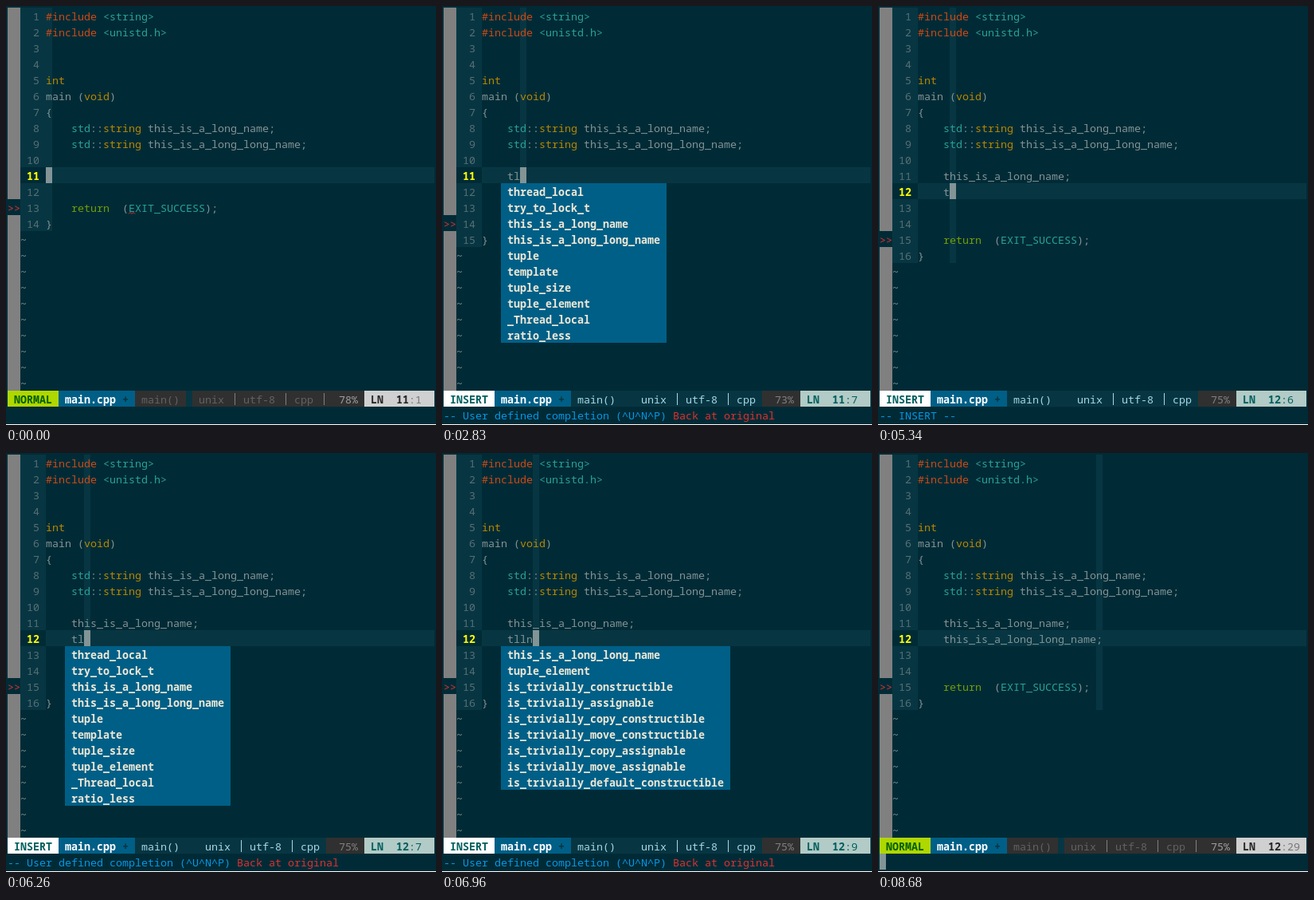
Animation, 540 px wide and 525 px high, one loop 8.73 s. Source, as an HTML page with a canvas:

```html
<!DOCTYPE html>
<html lang="en">
<head>
<meta charset="utf-8">
<title>Editor completion</title>
<style>
html, body { margin: 0; width: 100%; height: 100%; overflow: hidden; background: #002b36; }
canvas { display: block; }
</style>
</head>
<body>
<canvas id="stage" width="540" height="525"></canvas>
<script>
const ctx = document.getElementById('stage').getContext('2d');
const LOOP = 8730, CELL = 8, ROW = 20, PAD = 2, BASELINE = 16, CODE_X = 50;
const STATUS_ROW = 25, MESSAGE_ROW = 26;
const C = {
  bg: '#002b36', shade: '#073642', dim: '#586e75', text: '#839496', orange: '#cb4b16',
  cyan: '#2aa198', yellow: '#b58900', green: '#719e07', red: '#dc322f', blue: '#0896e6',
  menu: '#005f87', menuSel: '#0087af', menuText: '#eee8d5', grey: '#303030'
};

// Each line of code is a list of [color, text] runs.
const declare = name => [[C.text, '    '], [C.cyan, 'std'], [C.text, '::'], [C.yellow, 'string'], [C.text, ` ${name};`]];
const include = file => [[C.orange, '#include '], [C.cyan, `<${file}>`]];
const NAME = 'this_is_a_long_name', LONG_NAME = 'this_is_a_long_long_name';
const HEAD = [
  include('string'), include('unistd.h'), [], [],
  [[C.yellow, 'int']],
  [[C.text, 'main ('], [C.yellow, 'void'], [C.text, ')']],
  [[C.text, '{']],
  declare(NAME), declare(LONG_NAME), []
];
const TAIL = [
  [], [],
  [[C.green, '    return'], [C.text, '  ('], [C.cyan, 'EXIT_SUCCESS'], [C.text, ');']],
  [[C.text, '}']]
];

const trivially = names => names.split(' ').map(name => 'is_trivially_' + name);
const TLLN_LIST = [LONG_NAME, 'tuple_element', ...trivially(
  'constructible assignable copy_constructible move_constructible copy_assignable move_assignable default_constructible')];
const TLN_LIST = [NAME, ...TLLN_LIST];
const TLL_LIST = [LONG_NAME, 'thread_local', 'tuple_element', '_Thread_local', 'const_local_iterator',
  ...trivially('copyable assignable destructible constructible'), 'ratio_less_equal'];
const TL_LIST = ['thread_local', 'try_to_lock_t', NAME, LONG_NAME, 'tuple', 'template',
  'tuple_size', 'tuple_element', '_Thread_local', 'ratio_less'];
const T_LIST = [NAME, LONG_NAME, 'thread_local', 'template', 'typedef', 'typename', 'this', 'throw', 'true', 'try'];

const INSERT = '-- INSERT --';
const COMPLETION = '-- User defined completion (^U^N^P) ';
const BACK = 'Back at original';
const DONE = NAME + ';', LONG_DONE = LONG_NAME + ';';

// [start in ms, typed lines, column, options]
const STATES = [
  [0, [], 1, { normal: true, cursor: true, lint: true }],
  [710, [''], 1, { normal: true, message: INSERT }],
  [750, [''], 5, { cursor: true }],
  [2100, ['t'], 5, { columnTop: 12 }],
  [2140, ['t'], 6, { cursor: true, list: T_LIST }],
  [2790, ['tl'], 6, { note: BACK }],
  [2830, ['tl'], 7, { cursor: true, list: TL_LIST }],
  [3020, ['tln'], 8, { cursor: true, list: TLN_LIST }],
  [3640, [NAME], 8, { list: TLN_LIST }],
  [3680, [NAME], 8, { list: TLN_LIST, selected: true }],
  [3960, [DONE], 8, { list: TLN_LIST, selected: true }],
  [4400, [DONE, ''], 5, {}],
  [4440, [DONE, ''], 5, { cursor: true }],
  [5300, [DONE, 't'], 5, {}],
  [5340, [DONE, 't'], 6, { cursor: true }],
  [6220, [DONE, 'tl'], 6, {}],
  [6260, [DONE, 'tl'], 7, { cursor: true, list: TL_LIST }],
  [6520, [DONE, 'tll'], 8, { message: '' }],
  [6570, [DONE, 'tll'], 8, { cursor: true, list: TLL_LIST }],
  [6920, [DONE, 'tlln'], 8, { note: BACK }],
  [6960, [DONE, 'tlln'], 9, { cursor: true, list: TLLN_LIST }],
  [7520, [DONE, LONG_NAME], 9, { list: TLLN_LIST }],
  [7560, [DONE, LONG_NAME], 9, { list: TLLN_LIST, selected: true }],
  [7860, [DONE, LONG_DONE], 9, { list: TLLN_LIST, selected: true }],
  [8680, [DONE, LONG_DONE], 29, { normal: true, commandCursor: true }]
];

const rowTop = row => PAD + (row - 1) * ROW;

function box(x, row, width, color, rows = 1) {
  ctx.fillStyle = color;
  ctx.fillRect(x, rowTop(row), width, rows * ROW);
}

function write(x, row, color, text, bold = false) {
  ctx.font = `${bold ? 'bold ' : ''}13.333px "Noto Sans Mono", monospace`;
  ctx.fillStyle = color;
  ctx.fillText(text, x, rowTop(row) + BASELINE);
}

function writeRuns(x, row, runs) {
  for (const [color, text] of runs) {
    write(x, row, color, text);
    x += text.length * CELL;
  }
}

function drawSquiggle(x, y) {
  ctx.strokeStyle = C.red;
  ctx.lineWidth = 1;
  ctx.beginPath();
  for (let i = 0; i <= 4; i++) ctx.lineTo(x + i * 2, y + (i % 2 ? -1.5 : 0.5));
  ctx.stroke();
}

function drawCode(typed, row, column, { cursor, columnTop = 1, lint }) {
  const lines = [...HEAD, ...typed.map(text => [[C.text, '    ' + text]]), ...TAIL];
  const signRow = lines.length - 1;
  const columnX = CODE_X + (column - 1) * CELL;

  box(PAD, 1, 16, '#808080', 24);
  box(PAD, signRow, 16, C.bg);
  write(PAD, signRow, C.red, '>>');
  box(18, 1, 32, C.shade, lines.length);
  box(18, row, 32, C.bg);
  box(columnX, columnTop, CELL, C.shade, lines.length - columnTop + 1);
  box(CODE_X, row, 488, C.shade);
  if (cursor) box(columnX, row, CELL, C.text);

  lines.forEach((runs, i) => {
    const current = i + 1 === row;
    write(26, i + 1, current ? '#ffff00' : C.dim, String(i + 1).padStart(2), current);
    writeRuns(CODE_X, i + 1, runs);
  });
  for (let r = lines.length + 1; r < STATUS_ROW; r++) write(18, r, C.text, '~');
  if (lint) drawSquiggle(154, rowTop(signRow) + 18);
}

function drawMenu(list, row, selected) {
  const width = (Math.max(...list.map(item => item.length)) + 2) * CELL;
  box(74, row + 1, width, C.menu, list.length);
  if (selected) box(74, row + 1, width, C.menuSel);
  list.forEach((item, i) => write(82, row + 1 + i, C.menuText, item, true));
}

function drawStatus(normal, row, column, lineCount) {
  const look = normal
    ? { mode: 'NORMAL', modeBg: '#afd700', modeText: '#005f00', midBg: C.grey, midText: '#626262',
        infoX: 242, percent: '#9e9e9e', endBg: '#d0d0d0', endText: '#262626', columnText: '#767676' }
    : { mode: 'INSERT', modeBg: '#ffffff', modeText: '#005f5f', midBg: C.shade, midText: '#a5d8e6',
        infoX: 250, percent: '#808080', endBg: '#b2cbc6', endText: '#005f5f', columnText: '#005f5f' };
  const put = (x, color, text, bold) => write(x, STATUS_ROW, color, text, bold);
  const fill = (x, width, color) => box(x, STATUS_ROW, width, color);

  fill(PAD, 64, look.modeBg);
  fill(66, 96, C.menu);
  fill(162, 240, look.midBg);
  fill(402, 48, C.grey);
  fill(450, 88, look.endBg);
  if (normal) fill(226, 8, C.shade);

  put(10, look.modeText, look.mode, true);
  put(74, '#ffffff', 'main.cpp', true);
  put(146, C.shade, '+', true);
  put(170, look.midText, 'main()');
  put(look.infoX, look.midText, 'unix');
  put(look.infoX + 56, look.midText, 'utf-8');
  put(look.infoX + 120, look.midText, 'cpp');
  ctx.fillStyle = normal ? '#808080' : look.midText;
  const bars = normal ? [45, 109, 157] : [45, 109];
  for (const dx of bars) ctx.fillRect(look.infoX + dx, rowTop(STATUS_ROW) + 3, 1, 15);
  put(418, look.percent, Math.floor(row / lineCount * 100) + '%');
  put(458, look.endText, 'LN', true);
  put(490, look.endText, String(row), true);
  put(506, look.columnText, ':' + column);
}

function drawMessage({ normal, list, selected, message, note }) {
  if (selected) note = `match 1 of ${list.length}`;
  else if (list) note = BACK;
  if (note) writeRuns(PAD, MESSAGE_ROW, [[C.blue, COMPLETION], [selected ? C.cyan : C.red, note]]);
  else write(PAD, MESSAGE_ROW, C.blue, message ?? (normal ? '' : INSERT));
}

function draw(now) {
  const time = now % LOOP;
  const [, typed, column, options] = STATES.findLast(state => state[0] <= time);
  const row = HEAD.length + Math.max(1, typed.length);
  const lineCount = HEAD.length + typed.length + TAIL.length;

  ctx.fillStyle = C.bg;
  ctx.fillRect(0, 0, 540, 525);
  ctx.fillStyle = '#ffffff';
  ctx.fillRect(0, 524, 540, 1);
  drawCode(typed, row, column, options);
  if (options.list) drawMenu(options.list, row, options.selected);
  drawStatus(options.normal, row, column, lineCount);
  drawMessage(options);
  if (options.commandCursor) box(PAD, MESSAGE_ROW, CELL, C.text);
}

const start = performance.now();
function tick() {
  draw(performance.now() - start);
  requestAnimationFrame(tick);
}
tick();
</script>
</body>
</html>
```
